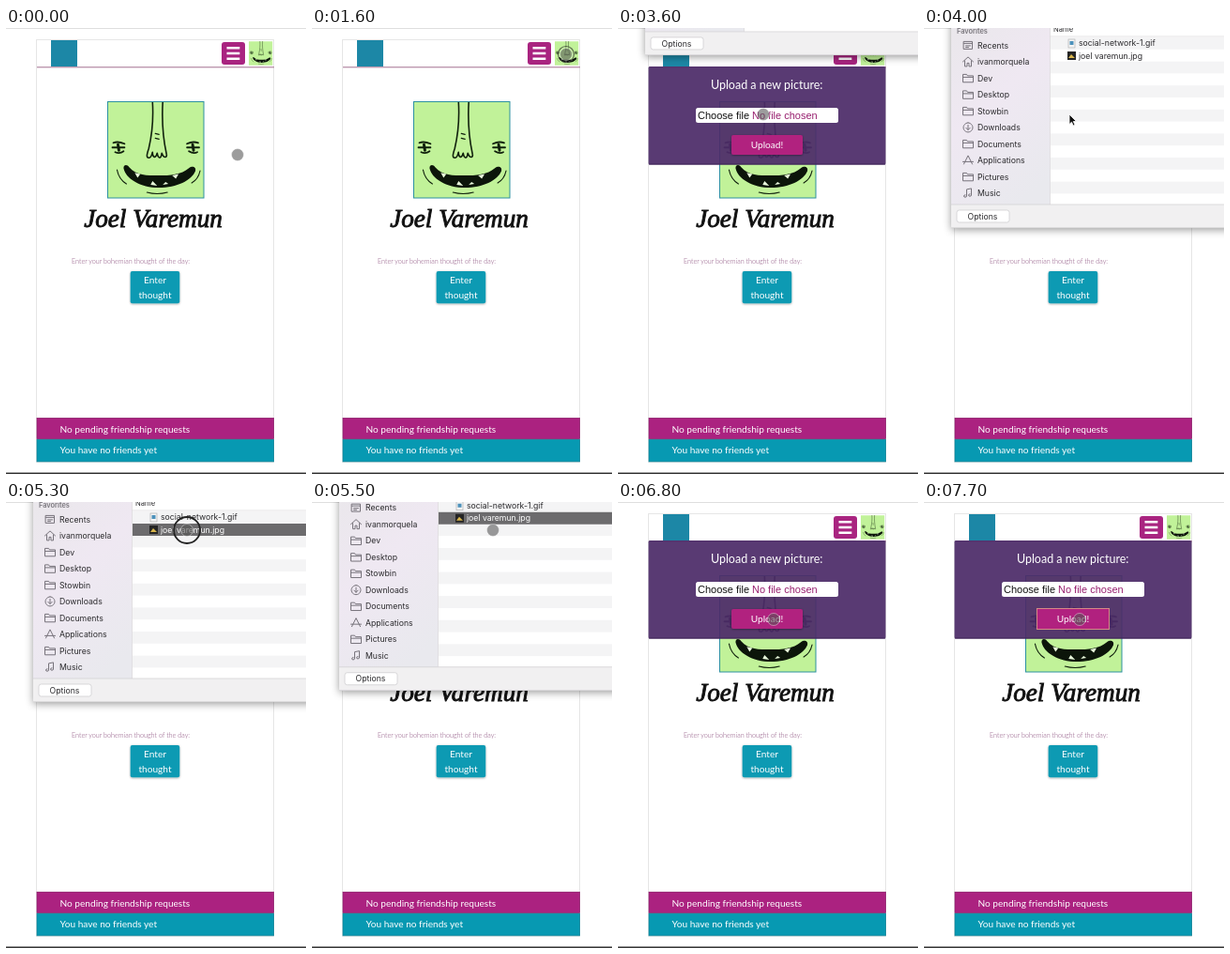
An HTML page for the animation above (8000 ms loop, 320 by 475 pixels).

```html
<!DOCTYPE html>
<html lang="en">
<head>
<meta charset="utf-8">
<title>Profile picture upload</title>
<style>
html, body { margin: 0; width: 100%; height: 100%; overflow: hidden; background: #fff; }
svg { display: block; width: 100%; height: 100%; }
text { font-family: Lato, "Open Sans", sans-serif; font-size: 10.1px; fill: #fff; }
.mid { text-anchor: middle; }
.mac text { font-family: Inter, "Liberation Sans", sans-serif; font-size: 8.7px; fill: #2b2a2d; }
.input text { font-family: "Liberation Sans", Arial, sans-serif; font-size: 11px; }
.name { font: italic 27.2px "Liberation Serif", serif; fill: #111; stroke: #111; stroke-width: .9; }
.hint { font-size: 7.2px; font-weight: 300; fill: #8a4d7c; }
.title { font-size: 12.5px; }
.line { fill: none; stroke: #10200c; stroke-linecap: round; stroke-linejoin: round; }
.icon { fill: none; stroke: #77737b; stroke-width: 1; stroke-linejoin: round; stroke-linecap: round; }
</style>
</head>
<body>
<svg viewBox="0 0 320 475" preserveAspectRatio="none">
  <defs>
    <linearGradient id="side" x1="0" y1="0" x2=".4" y2="1">
      <stop offset="0" stop-color="#e9e7ea"/>
      <stop offset=".5" stop-color="#efe8f2"/>
      <stop offset="1" stop-color="#e9e9ee"/>
    </linearGradient>
    <filter id="soft" x="-20%" y="-20%" width="140%" height="140%">
      <feDropShadow dx="0" dy=".7" stdDeviation="1" flood-opacity=".4"/>
    </filter>
    <filter id="sheetShadow" x="-10%" y="-10%" width="120%" height="125%">
      <feDropShadow dx="0" dy="2" stdDeviation="4" flood-opacity=".4"/>
    </filter>
    <symbol id="face" viewBox="0 0 103 103">
      <rect width="103" height="103" fill="#c1f299"/>
      <g class="line" stroke-width="1.6">
        <path d="M48 0C49 16 48 33 44 50C42 56 41 60 44 60C47 60 47 57 48 54C48 59 51 62 53 55C54 61 57 62 58 55C60 61 64 60 63 56C59 38 58 18 59 0"/>
        <path d="M51 34l4 1M51 39l4 1" stroke-width="1.2"/>
        <path d="M6 44q5 -2 12 1M5 49h13M8 54q5 2 9 -1" stroke-width="1.8"/>
        <path d="M85 45q6 -3 12 -1M85 49h13M87 53q5 3 9 1" stroke-width="1.8"/>
        <path d="M11 46l1 6M91 46l1 6" stroke-width="3"/>
        <path d="M10 73q2 10 10 15M99 74q-2 9 -9 13M42 97q11 3 22 0" stroke-width="1.1"/>
      </g>
      <path d="M17 71C17 67 21 67 23 70C31 79 42 79 54 79C67 79 79 78 87 71C91 68 95 70 94 74C90 84 74 92 55 92C35 92 19 82 17 71Z" fill="#0c150a"/>
      <path d="M29 76l6 1.5l-3 4zM69 79l7 -1.5l-3 5zM46 89l2 -4l5 5zM59 89l3 -3l3 2z" fill="#e9f9dc"/>
    </symbol>
  </defs>

  <rect width="320" height="475" fill="#fff"/>
  <path d="M0 .5H320" stroke="#dedede"/>
  <rect x="32.5" y="12.5" width="253" height="450" fill="#fff" stroke="#e6e6e6"/>

  <rect x="48" y="13" width="28" height="28" fill="#1c87a6"/>
  <path d="M33 41.8H286" stroke="#a3708f"/>
  <rect x="230" y="15" width="25" height="24" rx="3" fill="#a92480"/>
  <path d="M235.5 21.3H249.3M235.5 27H249.3M235.5 32.7H249.3" stroke="#fff" stroke-width="2.4"/>
  <use href="#face" x="259" y="14" width="25.5" height="26"/>

  <use href="#face" x="108.5" y="78.5" width="102.5" height="102.5"/>
  <rect x="108.5" y="78.5" width="102.5" height="102.5" fill="none" stroke="#2d91a0"/>
  <text class="mid name" x="157" y="212">Joel Varemun</text>
  <text class="hint" x="70" y="251">Enter your bohemian thought of the day:</text>
  <rect x="132.7" y="259" width="52.5" height="34.3" rx="2" fill="#0b9ab3" filter="url(#soft)"/>
  <text class="mid" x="159" y="271.6">Enter</text>
  <text class="mid" x="159" y="288">thought</text>

  <rect x="33" y="415.5" width="252.5" height="22" fill="#ab2280" stroke="#8d1c6a" stroke-width=".8"/>
  <rect x="33" y="438.3" width="252.5" height="23.5" fill="#0799b2" stroke="#078197" stroke-width=".8"/>
  <text x="57.5" y="431">No pending friendship requests</text>
  <text x="57.5" y="452.5">You have no friends yet</text>

  <g id="modal">
    <rect x="32.5" y="41" width="253" height="104.5" rx="1.5" fill="#4d2c69" fill-opacity=".93"/>
    <path d="M33 145H285" stroke="#3d2256"/>
    <text class="mid title" x="158.7" y="64.6">Upload a new picture:</text>
    <g class="input">
      <rect x="83" y="85" width="152" height="16" rx="2.5" fill="#fff"/>
      <text x="85" y="97.2" style="fill:#111">Choose file</text>
      <text x="143" y="97.2" style="fill:#98206f">No file chosen</text>
    </g>
    <rect id="upload" x="121" y="114" width="76" height="21" rx="2" fill="#b1217f" filter="url(#soft)"/>
    <rect id="focus" x="120.5" y="113.5" width="77" height="22" fill="#b1217f" stroke="#d58a86"/>
    <text class="mid" x="159" y="128.2">Upload!</text>
  </g>

  <g id="sheet" class="mac">
    <rect x="29" y="-20" width="310" height="233" fill="#f1f0f1" filter="url(#sheetShadow)"/>
    <rect x="29" y="-20" width="105.5" height="233" fill="url(#side)"/>
    <rect x="134.5" y="-20" width="186" height="208" fill="#fff"/>
    <g id="stripes"></g>
    <path d="M134.5 -20V188M134.5 9H320" stroke="#d8d6d9" stroke-width=".7" fill="none"/>
    <rect x="29" y="188" width="292" height="25" fill="#f1f0f1"/>
    <path d="M29 188H320M29 212.7H320" stroke="#cfcdd0" stroke-width=".7"/>
    <text x="35" y="6" style="font-size:7.4px;font-weight:600;fill:#79767c">Favorites</text>
    <text x="138" y="4.3" style="font-size:7.6px">Name</text>
    <g id="places"></g>
    <rect x="35" y="194" width="56" height="13" rx="2.5" fill="#fff" stroke="#cbc9cc" stroke-width=".7"/>
    <text class="mid" x="62.5" y="203.6">Options</text>
    <rect id="picked" x="135" y="23" width="186" height="13" fill="#6c6b6d"/>
    <rect x="154" y="12" width="7" height="9" fill="#f4f4f4" stroke="#a8a8a8" stroke-width=".6"/>
    <rect x="155.5" y="14" width="4" height="4" fill="#4d91bb"/>
    <rect x="153" y="25" width="9" height="9" fill="#252525"/>
    <path d="M154 32l3 -4l4 4z" fill="#d8b54b"/>
    <text x="165" y="19.4">social-network-1.gif</text>
    <text id="file" x="165" y="32.6">joel varemun.jpg</text>
  </g>

  <g id="cursor">
    <circle id="dot" r="6.5" fill="#555" fill-opacity=".58" stroke="#fff" stroke-opacity=".5" stroke-width=".8"/>
    <circle id="tap" r="8.5" fill="none" stroke="#333" stroke-opacity=".7" stroke-width="1.2"/>
    <circle id="ring" r="14" fill="none" stroke="#222" stroke-width="1.8"/>
    <path id="arrow" d="M0 0V10.5L2.5 8.2L4.2 12L6 11.2L4.3 7.5H7.5Z" fill="#111" stroke="#fff" stroke-width=".8"/>
  </g>
  <path d="M0 474.3H320" stroke="#333" stroke-width="1.4"/>
</svg>
<script>
const LOOP = 8000;
const $ = id => document.getElementById(id);
const show = (id, on) => { $(id).style.display = on ? '' : 'none'; };
const within = (t, a, b) => t >= a && t < b;
const clamp = v => Math.min(1, Math.max(0, v));
const smooth = p => p * p * (3 - 2 * p);
const easeOut = p => 1 - (1 - p) ** 2;
const ramp = (t, start, length, ease = smooth) => ease(clamp((t - start) / length));

const folder = 'M0 9V1H4L5 2.5H11V9ZM0 4H11';
const icons = {
  Recents: 'M1 1H10V9H1ZM1 3H10M3 5.5H8M3 7.2H6',
  ivanmorquela: 'M0 5L5.5 0L11 5M2 4V10H4.5V6.5H6.5V10H9V4',
  Dev: folder,
  Desktop: folder,
  Stowbin: folder,
  Downloads: 'M5.5 0a5 5 0 1 0 .01 0M5.5 2.5V7.5M3.3 5.4L5.5 7.6L7.7 5.4',
  Documents: folder,
  Applications: 'M1 9L5.5 0L10 9M0 6.5H11',
  Pictures: folder,
  Music: 'M4 8V1L9 0V7M4 8a1.5 1.2 0 1 1 -1.5 -1.1M9 7a1.5 1.2 0 1 1 -1.5 -1.1'
};
$('places').innerHTML = Object.entries(icons).map(([name, path], i) => {
  const y = 18.4 + i * 17.5;
  return `<path class="icon" d="${path}" transform="translate(41.5 ${y - 5})"/>` +
    `<text x="57" y="${y + 3.2}">${name}</text>`;
}).join('');
$('stripes').innerHTML = Array.from({ length: 7 }, (_, i) =>
  `<rect x="135" y="${10 + i * 25.6}" width="186" height="12.8" fill="#f4f4f5"/>`).join('');

// Pointer moves: start, length, destination, easing
const moves = [
  [800, 700, 271, 28, smooth],
  [2000, 800, 155, 92, smooth],
  [4150, 650, 193, 30, smooth],
  [5750, 560, 166, 125, easeOut]
];

function pointer(t) {
  let x = 247, y = 135;
  for (const [start, length, toX, toY, ease] of moves) {
    const p = ramp(t, start, length, ease);
    x += (toX - x) * p;
    y += (toY - y) * p;
  }
  return [x, y];
}

function draw(t) {
  const open = ramp(t, 3520, 350) - ramp(t, 5450, 350);
  const arrow = within(t, 3700, 5000);
  const picked = within(t, 5000, 5900);

  show('modal', t >= 1700);
  show('upload', t < 7500);
  show('focus', t >= 7500);
  show('sheet', open > 0);
  $('sheet').setAttribute('transform', `translate(0 ${213 * (open - 1)})`);
  show('picked', picked);
  $('file').style.fill = picked ? '#fff' : '';

  const [x, y] = pointer(t);
  $('cursor').setAttribute('transform', `translate(${x} ${y})`);
  show('arrow', arrow);
  show('dot', !arrow);
  show('tap', within(t, 1600, 1800) || within(t, 2900, 3200));
  show('ring', within(t, 5000, 5450));
}

function tick() {
  draw(performance.now() % LOOP);
  requestAnimationFrame(tick);
}
tick();
</script>
</body>
</html>
```
